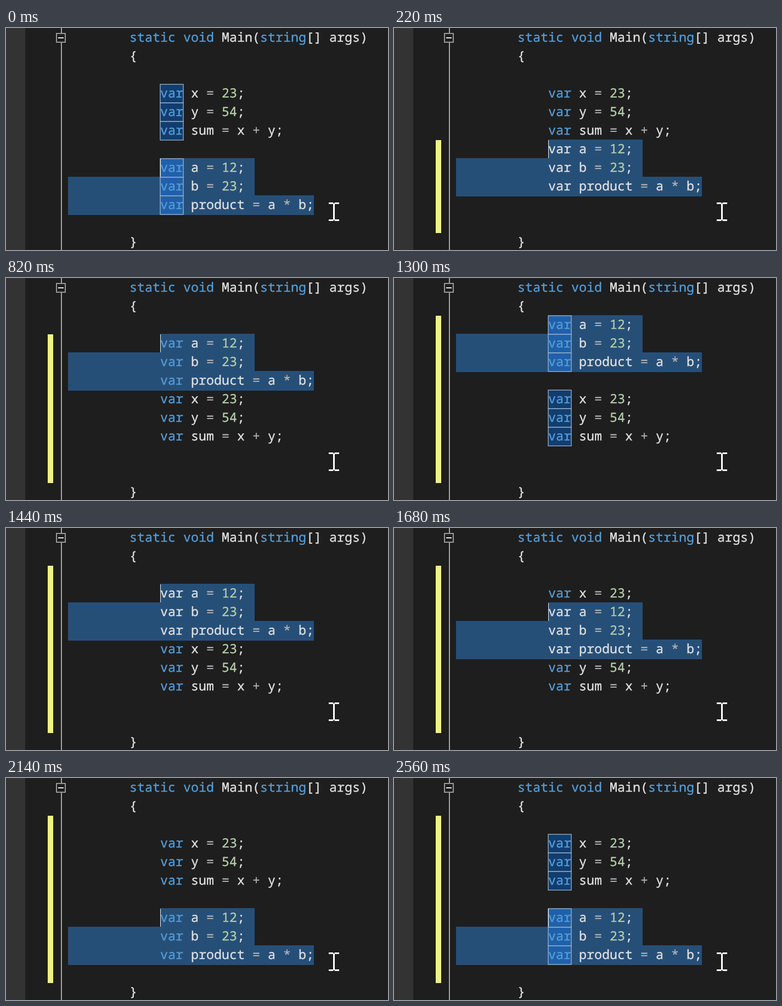
An HTML page for the animation above (2620 ms loop, 696 by 406 pixels).

```html
<!DOCTYPE html>
<html lang="en">
<head>
<meta charset="utf-8">
<title>Moving lines of code</title>
<style>
  html, body { margin: 0; width: 100%; height: 100%; overflow: hidden; background: #1e1e1e; }
  svg { display: block; width: 696px; height: 406px; }
  text {
    font: 23.333px "Noto Sans Mono", "DejaVu Sans Mono", monospace;
    font-variant-ligatures: none;
    text-rendering: geometricPrecision;
    white-space: pre;
  }
  tspan { color: #e0e0e0; fill: currentColor; stroke: currentColor; stroke-width: .35; }
  .key { color: #569cd6; }
  .num { color: #b5cea8; }
  .op { color: #b4b4b4; }
  .plain .key { color: #e0e0e0; }
  .mark { fill: #113d6f; stroke: #9db4cb; stroke-width: 1.3; }
  .picked .mark { fill: #2060aa; }
</style>
</head>
<body>
<svg viewBox="0 0 696 406">
  <rect width="35" height="406" fill="#333"/>
  <path d="M101 0V9M101 27V406" stroke="#a5a5a5" stroke-width="2"/>
  <rect x="92" y="10" width="16" height="16" fill="#1e1e1e" stroke="#a5a5a5" stroke-width="1.8"/>
  <path d="M95 18H105" stroke="#e8e8e8" stroke-width="2"/>
  <rect id="bar" x="76" width="10" fill="#eff284"/>
  <path id="selection" d="M281 0H453V68H561V104H113V34H281Z" fill="#264f78"/>
  <g id="code"></g>
  <rect id="caret" x="281" width="1" height="33" fill="#f0f0f0"/>
  <path d="M588 320.5H596.5M598.5 320.5H607M588 351.5H596.5M598.5 351.5H607M597.5 321V351"
        stroke="#fff" stroke-width="3" fill="none"/>
</svg>
<script>
const ROW = 34, LEFT = 225, INDENT = 281, LOOP = 2620;
const HOME = 7, END = 11, RECOLOUR = 76;
const NS = "http://www.w3.org/2000/svg";
const byId = id => document.getElementById(id);

// Key presses that move the block; every nth one, except the last, is recoloured late.
const runs = [
  { dir: -1, keys: [220, 450, 620, 820, 970], nth: 2, settled: 1300 },
  { dir: 1, keys: [1440, 1680, 1830, 1990, 2140], nth: 1, settled: 2560 }
];

function add(parent, name, attrs = {}) {
  const el = document.createElementNS(NS, name);
  for (const key in attrs) el.setAttribute(key, attrs[key]);
  return parent.appendChild(el);
}

function tokenClass(word) {
  if (/^(static|void|string|var)$/.test(word)) return "key";
  if (/^\d+$/.test(word)) return "num";
  return /^[=+*]$/.test(word) ? "op" : "";
}

function place(el, row) {
  el.setAttribute("transform", `translate(0 ${row * ROW})`);
}

function addLine(source, x, row, name = "") {
  const line = add(byId("code"), "g", { class: name });
  if (x === INDENT)
    add(line, "rect", { class: "mark", x, y: 1, width: 42, height: ROW });
  const text = add(line, "text", { x, y: 25 });
  for (const word of source.match(/\w+|\s+|[^\w\s]/g))
    add(text, "tspan", { class: tokenClass(word) }).textContent = word;
  place(line, row);
  return line;
}

addLine("static void Main(string[] args)", LEFT, 0);
addLine("{", LEFT, 1);
addLine("}", LEFT, END);
const still = ["var x = 23;", "var y = 54;", "var sum = x + y;"]
  .map((s, i) => addLine(s, INDENT, 3 + i));
const block = ["var a = 12;", "var b = 23;", "var product = a * b;"]
  .map((s, i) => addLine(s, INDENT, HOME + i, "picked"));
const marks = document.querySelectorAll(".mark");

function stateAt(t) {
  const s = { top: HOME, changed: END, plain: false, marked: true, caret: true };
  for (const { dir, keys, nth, settled } of runs) {
    keys.forEach((at, i) => {
      if (t < at) return;
      s.top += dir;
      s.changed = Math.min(s.changed, s.top);
      const late = i % nth === 0 && i < keys.length - 1;
      s.plain = late && t < at + RECOLOUR;
      s.marked = t >= settled;
      s.caret = !(s.marked && dir < 0);
    });
  }
  return s;
}

function show({ top, changed, plain, marked, caret }) {
  block.forEach((line, i) => {
    place(line, top + i);
    line.classList.toggle("plain", plain);
  });
  // Lines below the block make room for its three rows.
  still.forEach((line, i) => place(line, 3 + i < top ? 3 + i : 6 + i));
  for (const mark of marks) mark.style.display = marked ? "" : "none";
  place(byId("selection"), top);
  byId("caret").setAttribute("y", top * ROW + 1);
  byId("caret").style.display = caret ? "" : "none";
  byId("bar").setAttribute("y", changed * ROW + 1);
  byId("bar").setAttribute("height", (END - changed) * ROW);
}

const start = performance.now();
function tick(now) {
  show(stateAt(Math.max(0, now - start) % LOOP));
  requestAnimationFrame(tick);
}
tick(start);
</script>
</body>
</html>
```
